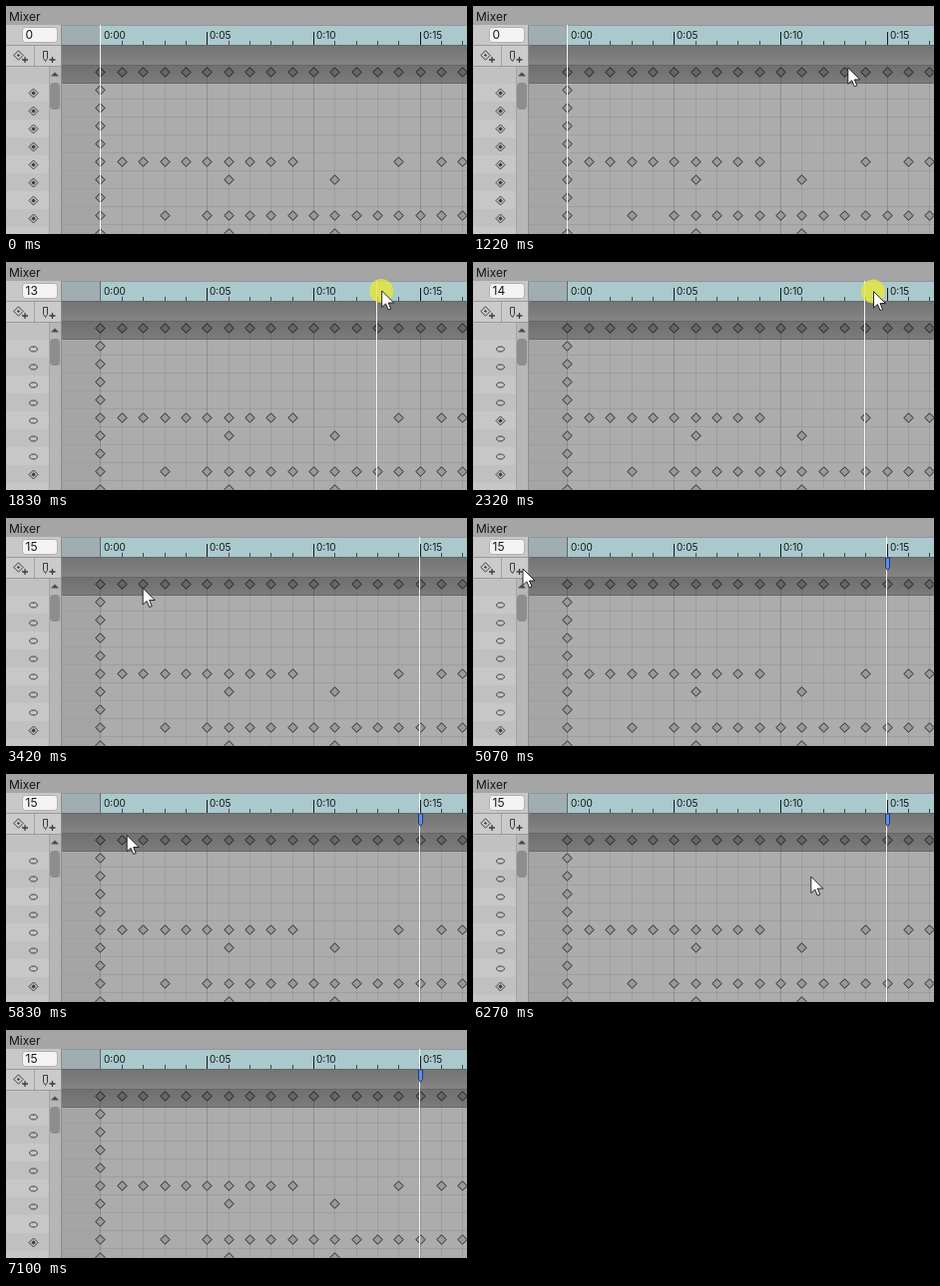
An HTML page that plays this animation: 462x229 px, repeating every 8 s.

```html
<!DOCTYPE html>
<html lang="en">
<head>
<meta charset="utf-8">
<title>Animation timeline</title>
<style>
  html, body { margin: 0; width: 100%; height: 100%; overflow: hidden; background: #a5a5a5; }
  svg { display: block; width: 462px; height: 229px; }
  text { font-family: Inter, Roboto, "Liberation Sans", sans-serif; fill: #151515; }
</style>
</head>
<body>
<svg id="stage" viewBox="0 0 462 229">
  <defs>
    <linearGradient id="band" x1="0" y1="0" x2="0" y2="1">
      <stop offset="0" stop-color="#747474"/>
      <stop offset="1" stop-color="#858585"/>
    </linearGradient>
    <linearGradient id="summary" x1="0" y1="0" x2="0" y2="1">
      <stop offset="0" stop-color="#6f6f6f"/>
      <stop offset="1" stop-color="#7c7c7c"/>
    </linearGradient>
  </defs>
</svg>
<script>
const LOOP = 8000;
const LAST = 17;
const STEP = 21.345;
const stage = document.getElementById('stage');

function add(tag, attrs, parent = stage) {
  const el = document.createElementNS('http://www.w3.org/2000/svg', tag);
  for (const k in attrs) el.setAttribute(k, attrs[k]);
  parent.append(el);
  return el;
}
const rect = (x, y, width, height, fill, more) => add('rect', { x, y, width, height, fill, ...more });
const path = (d, more, parent) => add('path', { d, ...more }, parent);
function label(x, y, size, str) {
  const el = add('text', { x, y, 'font-size': size });
  el.textContent = str;
  return el;
}
const show = (el, on) => el.setAttribute('visibility', on ? 'visible' : 'hidden');
const diamond = (x, y, r) => `M${x} ${y - r}l${r} ${r}l${-r} ${r}l${-r} ${-r}z`;

// Keys and grid snap right; labels and playhead snap left
const frameX = f => 94 + STEP * f;
const colX = f => Math.ceil(frameX(f));
const headX = f => Math.floor(frameX(f));

// Which frames hold a key, per row
const only0 = f => f === 0;
const sparse = f => f === 0 || f === 6 || f === 11;
const rows = [
  only0, only0, only0, only0,
  f => f < 10 || f === 14 || f > 15,
  sparse, only0,
  f => f === 0 || f === 3 || f > 4,
  sparse
];

// Title and ruler
rect(0, 0, 462, 19, '#a5a5a5');
label(3, 15, 12, 'Mixer');
rect(56, 19, 38, 21, '#a0adb1');
rect(94, 19, 368, 21, '#aac9cd');
rect(56, 19, 406, 1, '#8d9a9d');

// Event band, summary row, key area
rect(56, 40, 406, 19, 'url(#band)');
rect(56, 59, 406, 19, 'url(#summary)');
rect(56, 39, 406, 1, '#5f6a6c');
rect(56, 59, 406, 1, '#666');
rect(56, 78, 406, 151, '#acacac');
rect(56, 78, 38, 151, '#a5a5a5');
rect(56, 77, 406, 1, '#686868');
for (let y = 93; y < 229; y += 18) rect(56, y, 406, 1, '#9e9e9e');

for (let f = 0; f <= LAST; f++) {
  const x = colX(f), major = f % 5 === 0;
  rect(x, 59, 1, 19, '#000', { opacity: major ? 0.14 : 0.06 });
  rect(x, 78, 1, 151, '#000', { opacity: major ? 0.17 : 0.08 });
  rect(x, major ? 26 : 35, 1, major ? 13 : 4, major ? '#141a1b' : '#3c494b');
  if (major) label(headX(f) + 4, 33, 10, '0:' + String(f).padStart(2, '0'));
}
rect(94, 19, 1, 21, '#5c696b');

// Keys
for (let f = 0; f <= LAST; f++) {
  const x = colX(f) + 0.5;
  path(diamond(x, 66.5, 4.7), { fill: '#666', stroke: '#1d1d1d' });
  rows.forEach((has, i) => {
    if (has(f)) path(diamond(x, 84.5 + 18 * i, 4.7), { fill: '#999', stroke: '#272727' });
  });
}

// Left panel
rect(0, 19, 56, 210, '#c8c8c8');
rect(0, 39, 56, 1, '#9a9a9a');
rect(0, 40, 55, 20, '#cbcbcb');
rect(28, 40, 1, 20, '#a0a0a0');
rect(0, 60, 56, 1, '#9a9a9a');
rect(0, 61, 43, 17, '#c1c1c1');
rows.forEach((_, i) => rect(0, 78 + 18 * i, 43, 18, i % 2 ? '#c0c0c0' : '#c7c7c7'));
rect(16.5, 21.5, 35, 15, '#f3f3f3', { rx: 3, stroke: '#b0b0b0' });
const counter = label(19.5, 33, 12, '0');

// Toolbar icons
const line = { fill: 'none', stroke: '#3c3c3c' };
const plus = (x, y) => path(`M${x - 3} ${y}h6M${x} ${y - 3}v6`, { ...line, 'stroke-width': 1.3 });
path(diamond(12.5, 49.5, 4.7), line);
path(diamond(12.5, 49.5, 1.6), { fill: '#3c3c3c' });
plus(19, 54);
path('M37.5 45.5h4v7l-2 3l-2 -3z', line);
plus(46.5, 54);

// Scrollbar
rect(43, 61, 12, 168, '#b6b6b6');
rect(43, 61, 1, 168, '#a3a3a3');
rect(55, 19, 1, 210, '#8c8c8c');
path('M45 70.5l4 -4l4 4z', { fill: '#4a4a4a' });
rect(44, 77, 10, 27, '#8d8d8d', { rx: 4 });

// Row icons: keyed or unkeyed at the playhead
const icons = rows.slice(0, -1).map((has, i) => {
  const y = 87.5 + 18 * i;
  const on = add('g', {});
  path(diamond(27.5, y, 4.5), line, on);
  path(diamond(27.5, y, 2.2), { fill: '#3c3c3c' }, on);
  const off = path(`M23 ${y}l2.6 -2.4h3.8l2.6 2.4l-2.6 2.4h-3.8z`, { ...line, 'stroke-linejoin': 'round' });
  return { has, on, off };
});

// Moving parts
const playhead = rect(0, 19, 1, 210, '#f4f4f4');
const marker = path('M413.5 40h4v9.5l-2 3l-2 -3z', { fill: '#5c8fe8', stroke: '#20386e' });
const tip = add('g', {});
add('rect', { x: 6.5, y: 71.5, width: 69, height: 24, fill: '#e2e2e2', stroke: '#8a8a8a' }, tip);
const tipText = add('text', { x: 12, y: 87.5, 'font-size': 11 }, tip);
tipText.textContent = 'Add event.';
const halo = add('circle', { cx: -0.5, r: 12, fill: '#e8e63c', opacity: 0.8 });
const cursor = path('M0 0V16.4L3.9 12.9L6.5 19L9 18L6.5 12H12z',
  { fill: '#fff', stroke: '#111', 'stroke-width': 0.9, 'stroke-linejoin': 'round' });

// Cursor path: time, x, y
const track = [
  [450, 386, 245], [870, 378, 130], [1220, 375.8, 62], [1290, 374, 58],
  [1550, 372, 29], [1700, 373, 29], [2110, 391, 29], [2320, 401.5, 29.6],
  [2540, 406, 29], [2840, 406, 29], [3420, 137.5, 70.5], [3630, 89, 57],
  [4100, 50, 51], [5570, 50, 51], [6270, 338.5, 103], [6370, 364, 116],
  [7090, 458, 228]
];

// Monotone cubic through the track
function slope(i, c) {
  if (i === 0 || i === track.length - 1) return 0;
  const secant = j => (track[j + 1][c] - track[j][c]) / (track[j + 1][0] - track[j][0]);
  const a = secant(i - 1), b = secant(i);
  return a * b > 0 ? 2 * a * b / (a + b) : 0;
}
function along(t, c) {
  let i = track.findIndex(k => k[0] > t) - 1;
  if (i === -2) return track.at(-1)[c];
  i = Math.max(i, 0);
  const a = track[i], b = track[i + 1], d = b[0] - a[0];
  const u = Math.min(Math.max((t - a[0]) / d, 0), 1), v = 1 - u;
  return v * v * ((1 + 2 * u) * a[c] + u * d * slope(i, c)) +
         u * u * ((3 - 2 * u) * b[c] - v * d * slope(i + 1, c));
}

const PRESS = 1620, SETTLE = 2540;
const between = (t, a, b) => t >= a && t < b;

function draw(t) {
  const x = along(t, 1), y = along(t, 2);
  const frame = t < PRESS ? 0 : Math.round((along(Math.min(t, SETTLE), 1) - 94.5) / STEP);

  counter.textContent = frame;
  playhead.setAttribute('x', headX(frame));
  for (const { has, on, off } of icons) {
    show(on, has(frame));
    show(off, !has(frame));
  }
  show(marker, t >= 5070);
  show(tip, between(t, 4570, 4780));
  show(halo, between(t, PRESS, 2690) || between(t, 4780, 4940));
  show(cursor, between(t, 510, 7100));
  const move = `translate(${x.toFixed(2)} ${y.toFixed(2)})`;
  halo.setAttribute('transform', move);
  cursor.setAttribute('transform', move);
}

const start = performance.now();
function tick() {
  draw((performance.now() - start) % LOOP);
  requestAnimationFrame(tick);
}
tick();
</script>
</body>
</html>
```
